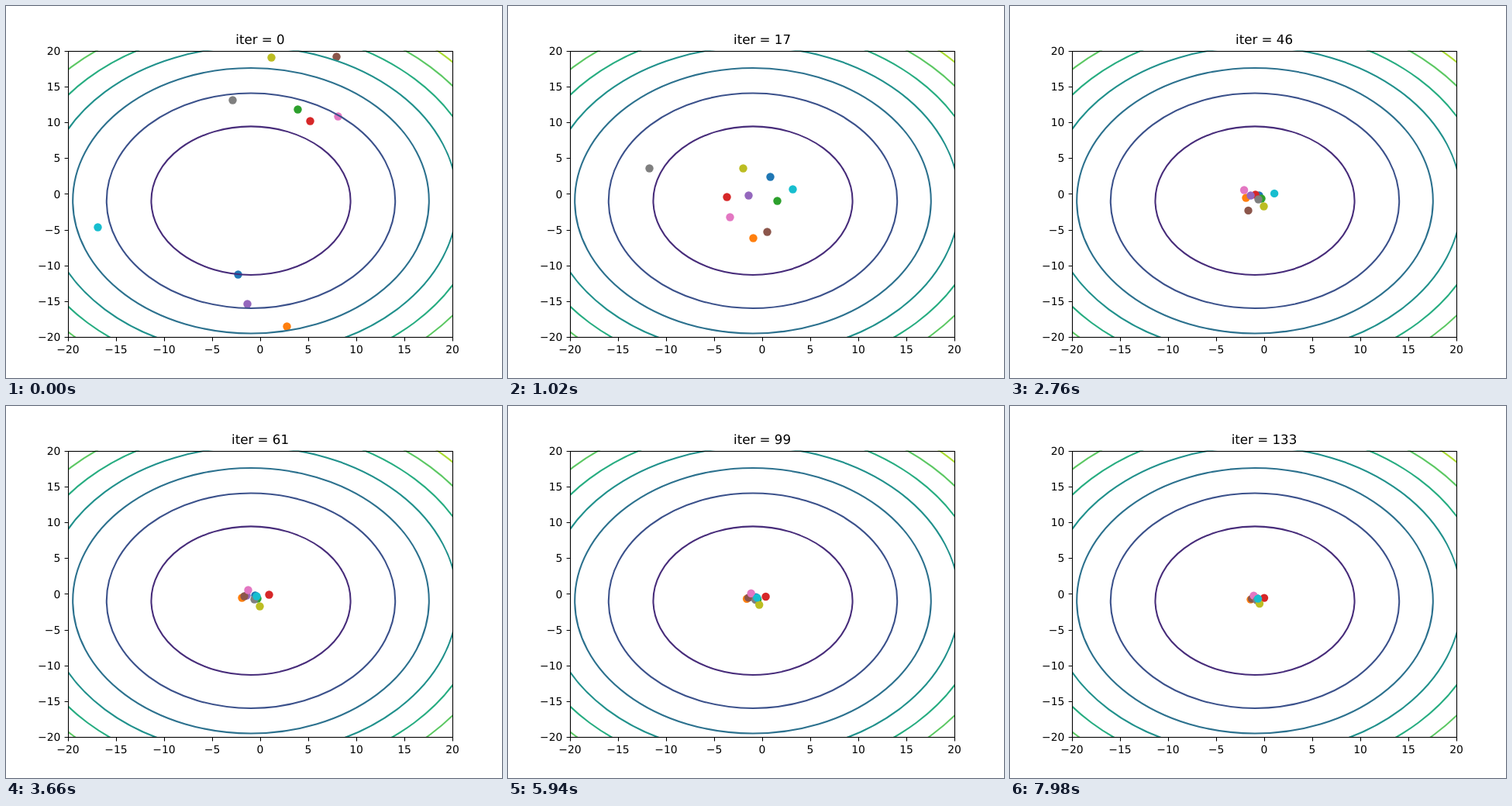
An HTML page that plays this animation: 640x480 px, repeating every 8000 ms.

```html
<!DOCTYPE html>
<html lang="en">
<head>
<meta charset="utf-8">
<title>Swarm search</title>
<style>
  html, body { margin: 0; width: 100%; height: 100%; overflow: hidden; background: #fff; }
  svg { display: block; width: 640px; height: 480px; }
  text { font: 13.89px "DejaVu Sans", sans-serif; text-rendering: geometricPrecision; }
  #title { font-size: 16.67px; }
</style>
</head>
<body>
<svg viewBox="0 0 640 480">
  <defs><clipPath id="plot"><rect x="80" y="57.6" width="496" height="369.6"/></clipPath></defs>
  <g id="dots" clip-path="url(#plot)"></g>
  <g id="contours" clip-path="url(#plot)" fill="none" stroke-width="2.08"></g>
  <g id="axes" stroke="#000" stroke-width="1.1" fill="none">
    <rect x="80.5" y="58.5" width="496" height="369"/>
  </g>
  <g id="labels"></g>
  <text id="title" x="328" y="49" text-anchor="middle"></text>
</svg>
<script>
const STEP = 60, LOOP = 8000;
const UNIT_X = 12.4, UNIT_Y = 9.24;
const OPTIMUM = [316, 251.2];
// Iterations in which the swarm moves from one key point to the next.
const STAGES = [[0, 17], [17, 50], [85, 118]];

const lineColors = ['#472c7a', '#3b518b', '#2c718e', '#21918c', '#27ad81', '#5cc863', '#aadc32'];

// Key points of each dot: scattered, gathered, settled.
const swarm = {
  '#1f77b4': [[299, 346], [338, 220], [321, 244]],
  '#ff7f0e': [[362, 413], [316, 299], [304, 247]],
  '#2ca02c': [[376, 133], [347, 251], [324, 248]],
  '#d62728': [[392, 148], [282, 246], [339, 243]],
  '#9467bd': [[311, 384], [310, 244], [310, 244]],
  '#8c564b': [[426, 65], [334, 291], [307, 245]],
  '#e377c2': [[428, 142], [286, 272], [312, 237]],
  '#7f7f7f': [[292, 121], [182, 209], [320, 249]],
  '#bcbd22': [[342, 66], [303, 209], [327, 258]],
  '#17becf': [[118, 285], [367, 236], [323, 245]]
};

const $ = id => document.getElementById(id);
const mix = (a, b, amount) => a + (b - a) * amount;

function add(parent, tag, attrs, content = '') {
  const node = document.createElementNS('http://www.w3.org/2000/svg', tag);
  for (const key in attrs) node.setAttribute(key, attrs[key]);
  node.textContent = content;
  parent.append(node);
  return node;
}

function random(seed) {
  const value = Math.sin(seed * 12.9898) * 43758.5453;
  return value - Math.floor(value);
}

// Each coordinate reaches its next key value in two hard jumps at random times.
function leap(from, to, progress, seed) {
  const first = mix(0.1, 0.4, random(seed));
  const second = mix(0.45, 0.95, random(seed + 0.5));
  if (progress < first) return from;
  return progress < second ? mix(from, to, 0.6) : to;
}

function coordinate(points, axis, iter, seed) {
  return STAGES.reduce((value, [start, end], stage) =>
    leap(value, points[stage + 1][axis], (iter - start) / (end - start), seed + stage),
    points[0][axis]);
}

lineColors.forEach((stroke, i) => {
  const radius = Math.sqrt(118 * (i + 1) - 10.5);
  add($('contours'), 'ellipse', {
    cx: OPTIMUM[0], cy: OPTIMUM[1], rx: radius * UNIT_X, ry: radius * UNIT_Y, stroke
  });
});

for (let value = -20; value <= 20; value += 5) {
  const label = String(value).replace('-', '\u2212');
  const x = 328 + value * UNIT_X;
  const y = 242.4 - value * UNIT_Y;
  add($('axes'), 'path', { d: `M${x + 0.5} 428v4.4M80 ${Math.round(y) + 0.5}h-4.4` });
  add($('labels'), 'text', { x, y: 448, 'text-anchor': 'middle' }, label);
  add($('labels'), 'text', { x: 70.3, y: Math.round(y + 5.28), 'text-anchor': 'end' }, label);
}

const dots = Object.entries(swarm).map(([fill, points]) => {
  const tightened = points[2].map((value, axis) => mix(value, OPTIMUM[axis], 0.5));
  return { node: add($('dots'), 'circle', { r: 5.2, fill }), points: [...points, tightened] };
});

function draw() {
  const iter = Math.floor(performance.now() % LOOP / STEP);
  $('title').textContent = `iter = ${iter}`;
  dots.forEach(({ node, points }, i) => {
    ['cx', 'cy'].forEach((name, axis) =>
      node.setAttribute(name, coordinate(points, axis, iter, i * 7 + axis * 3 + 1) + 0.5));
  });
  requestAnimationFrame(draw);
}
draw();
</script>
</body>
</html>
```
